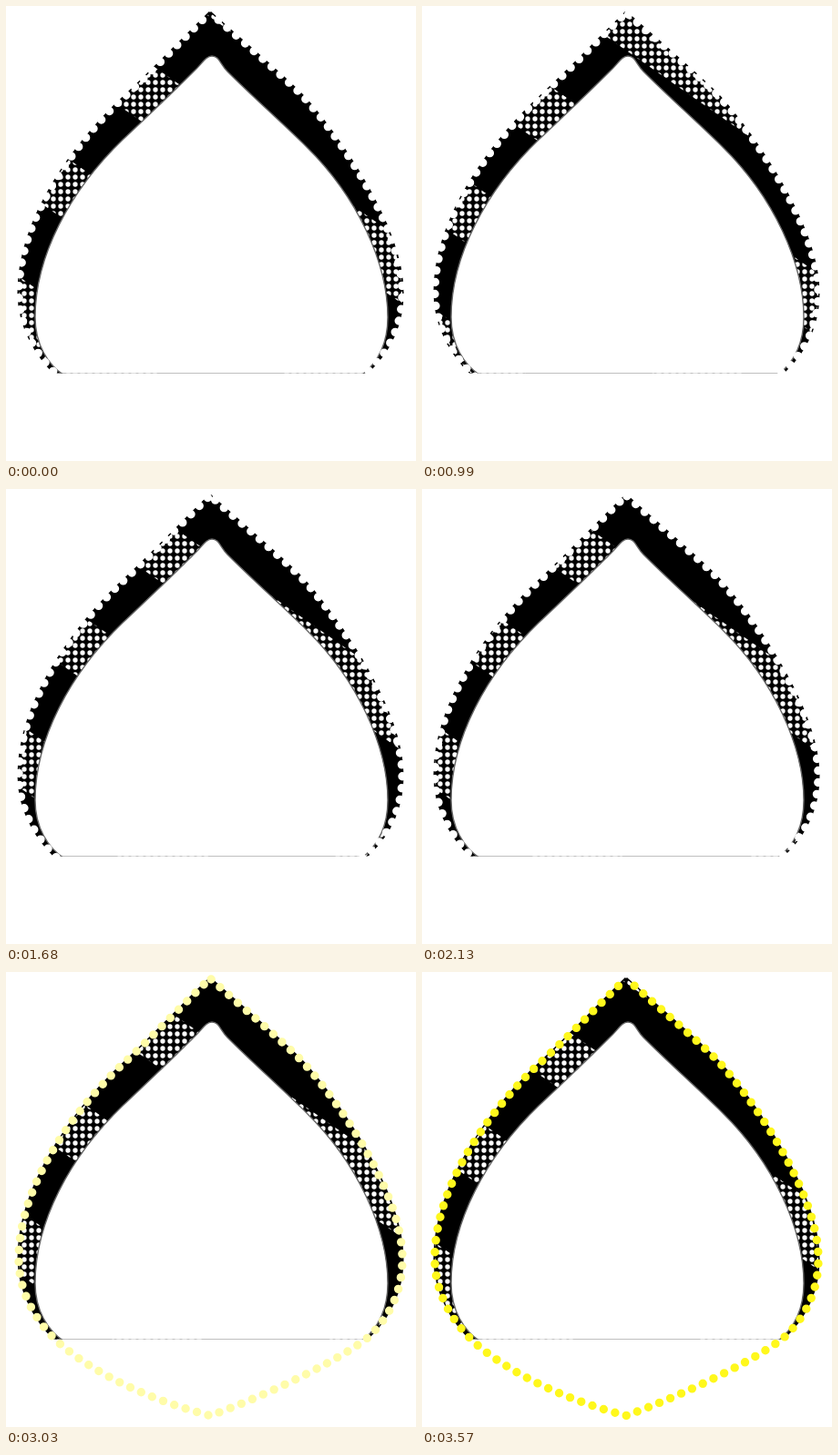
Animation of 450x500 px, one loop 3600 ms. Source, as an HTML page:

```html
<!DOCTYPE html>
<html>
<head>
<meta charset="utf-8">
<style>
  html, body { margin: 0; width: 100%; height: 100%; overflow: hidden; background: #fff; }
  svg { display: block; }
  #beads { fill: none; stroke-width: 9.4; stroke-linecap: round; stroke-dasharray: 0 1; }
  #hollow { fill: #fff; stroke: #666; stroke-width: 1.4; filter: blur(0.6px); }
</style>
</head>
<body>
<svg width="450" height="500" viewBox="0 0 450 500">
  <defs>
    <pattern id="halftone" width="8" height="8" patternUnits="userSpaceOnUse">
      <circle cx="4" cy="4" r="2.65" fill="#fff"/>
    </pattern>
    <path id="outline" pathLength="103.86" d="M224 7C262 41 292 66 320 93S435 235 435 315
      C435 350 422 378 398 401C372 423 290 464 224 487.5C172 474 108 449 62 411
      C36 389 14 355 14 315C14 230 80 148 123 106C155 77 190 40 224 7"/>
    <clipPath id="inside"><use href="#outline"/></clipPath>
    <clipPath id="upper"><rect width="450" height="403.5"/></clipPath>
  </defs>
  <g clip-path="url(#upper)">
    <use href="#outline" stroke="#000" stroke-width="3"/>
    <g clip-path="url(#inside)">
      <path id="stripes" stroke="url(#halftone)" stroke-width="57"/>
    </g>
    <path id="hollow" d="M64 406C46 394 32 372 32 342C32 275 70 203 128 147
      C150 126 175 103 206 72C215 64 219 55 226 55C234 55 235 64 243 72
      C272 101 305 130 330 155C386 210 419 283 419 342C419 372 408 392 390 406V440H64Z"/>
  </g>
  <use id="beads" href="#outline"/>
</svg>
<script>
const LOOP = 3600, STEP = 30;
const PERIOD = 137, FIRST_STRIPE = -10, ANGLE = 35 * Math.PI / 180;
const FADE_START = 2700, YELLOW = [255, 248, 20];
const stripes = document.getElementById('stripes');
const beads = document.getElementById('beads');

// Diagonal bands sliding perpendicular to their direction
function stripePath(shift) {
  let d = '';
  for (let k = -2; k <= 2; k++) {
    const offset = FIRST_STRIPE + shift + k * PERIOD;
    const yAt = x => (offset + x * Math.sin(ANGLE)) / Math.cos(ANGLE);
    d += `M-50 ${yAt(-50)}L500 ${yAt(500)}`;
  }
  return d;
}

function draw(now) {
  const time = Math.floor(now % LOOP / STEP) * STEP;
  const progress = time / (LOOP - STEP);

  stripes.setAttribute('d', stripePath(progress * 8 % 1 * PERIOD));
  beads.style.strokeDashoffset = -((0.93 + progress * 12) % 1);

  const fade = Math.max(0, (time - FADE_START) / (LOOP - FADE_START));
  beads.style.stroke = `rgb(${YELLOW.map(c => Math.round(255 + (c - 255) * fade))})`;
}

const start = performance.now();
function tick() {
  draw(performance.now() - start);
  requestAnimationFrame(tick);
}
tick();
</script>
</body>
</html>
```
